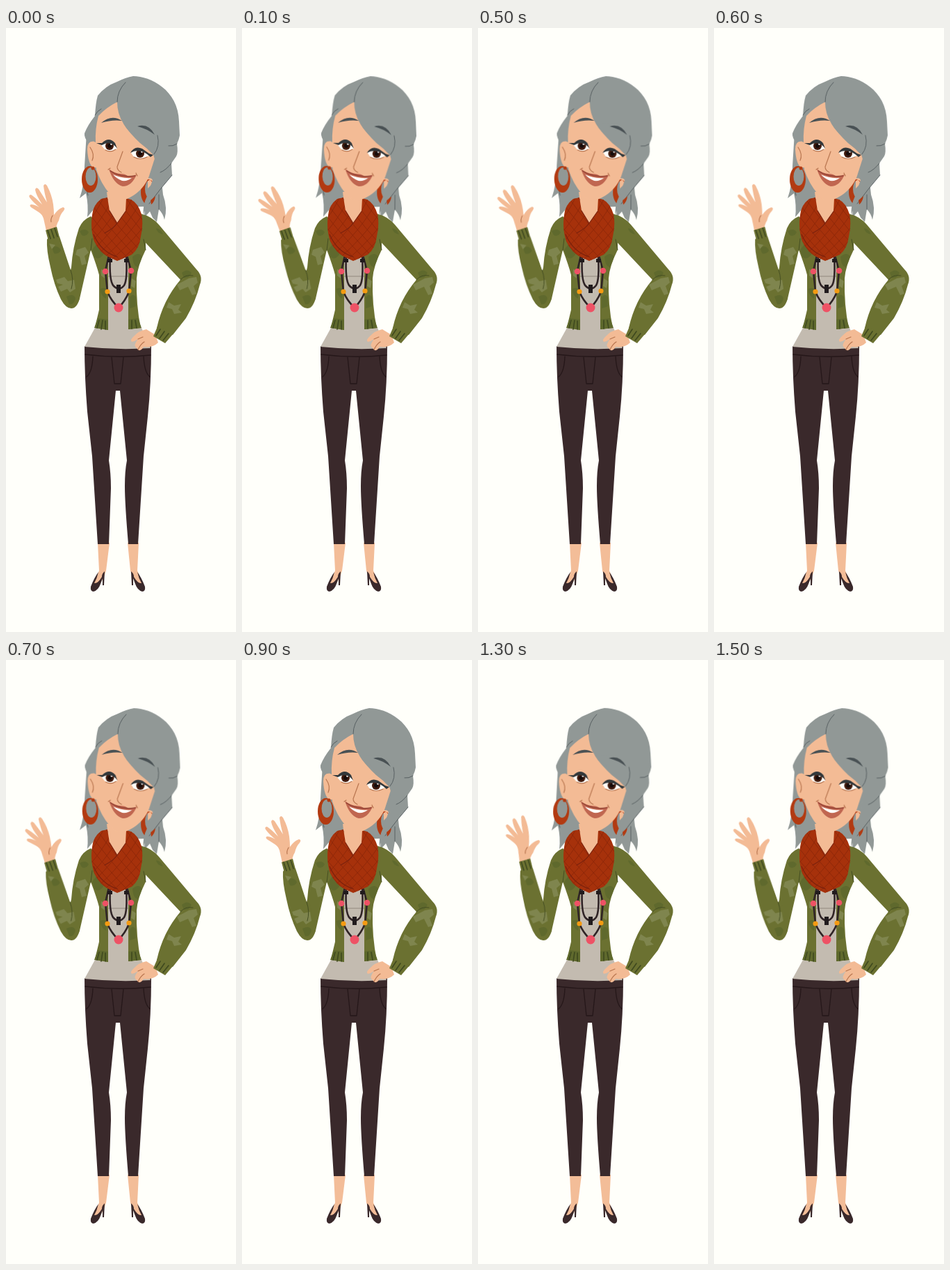
Write an HTML page that moves like this. It is 331 px wide and 866 px high and loops after 1600 ms.

```html
<!DOCTYPE html>
<html lang="en">
<head>
<meta charset="utf-8">
<title>Waving woman</title>
<style>
  html, body { margin: 0; width: 100%; height: 100%; overflow: hidden; background: #fffffa; }
  svg { display: block; width: 100%; height: 100%; }
  .hair { fill: #919896; }
  .skin { fill: #f3bb95; }
  .green { fill: #6b7131; }
  .dark { fill: #3a292b; }
  .rust { fill: #b23a11; }
  .shade { fill: #5f692d; }
  .light { fill: #7f854e; }
  .line { fill: none; stroke-linecap: round; stroke-linejoin: round; }
  .rib { stroke: #3f491f; stroke-width: 1.6; }
  .crease { stroke: #454e22; }
  .strand { stroke: #586062; stroke-width: 1; }
  .fold { stroke: #b8754f; stroke-width: 1.2; }
  .seam { stroke: #251719; stroke-width: 1.3; }
  .cord { stroke: #302426; stroke-width: 2.6; }
  .weave { stroke: #8d280a; stroke-width: .9; }
  .head, .forearm, .hand, .earring { transform-box: view-box; }
  .head { transform-origin: 162px 258px; }
  .forearm { transform-origin: 93px 394px; }
  .hand { transform-origin: 66px 288px; }
  .earring { transform-origin: 125px 199px; }
</style>
</head>
<body>
<svg viewBox="0 0 331 866" xmlns="http://www.w3.org/2000/svg">
  <defs>
    <clipPath id="scarfClip"><path id="scarfShape" d="M137 245Q125 254 124 268Q121 288 127 306Q135 322 147 328L160 334L181 325Q192 316 194 299Q198 282 195 267Q190 251 180 246L173 244L172 263L160 280L149 262L146 243Z"/></clipPath>
  </defs>

  <g class="head">
    <path class="hair" d="M116 150L113 198Q113 224 106 244L115 237Q119 254 117 271L128 258L200 256L199 272L207 263L211 272L217 278L220 260Q226 266 228 275Q233 258 226 239L224 220L235 190Z"/>
    <path class="line strand" d="M116 230L118 240M220 239L220 260"/>
  </g>

  <g id="legs">
    <path fill="#f3bd98" d="M132 738H149L144 778Q141 790 132 801L125 799L134 778ZM175 738H191L189 778L198 799L191 801Q182 790 179 778Z"/>
    <path class="dark" d="M133 780Q127 788 122 801Q121 808 126 808Q133 806 136 797L139 789L139 799H141L142 779Q138 782 138 787Q132 797 127 796Q131 789 133 780ZM189 780Q195 788 200 801Q201 808 196 808Q189 806 186 797L183 789L183 799H181L180 779Q184 782 184 787Q190 797 195 796Q191 789 189 780Z"/>
    <path class="dark" d="M113 456H209Q209 509 204 557L198 614L190 740H176Q171 681 171 657Q171 635 174 620L164 520H158L148 620Q151 638 151 660L148 740H132L124 614L117 550Q113 500 113 456Z"/>
    <path class="line seam" d="M114 468Q160 474 208 469M152 472L156 510H165L169 472M116 500Q124 494 125 471M207 500Q199 494 198 470"/>
  </g>

  <g id="torso">
    <path fill="#c3bbb0" d="M146 320H177V428L195 430L208 459Q160 462 113 457L128 430L146 432Z"/>
    <path class="line" stroke="#91887f" d="M147 356H176"/>
    <path class="green" d="M122 270Q110 275 105 287Q96 314 94 343L87 374L94 401Q102 400 106 388L122 318Q131 342 134 354V404L128 429L147 433V318L130 280Z"/>
    <path class="green" d="M193 266Q210 270 220 282L274 346Q284 356 279 368Q273 392 259 416L240 440L217 430Q226 390 251 361L201 308V318Q189 342 188 359Q187 398 194 430L176 432V320Z"/>
    <path class="shade" d="M106 291q9-5 13 2q-4 7-10 4zM136 374q8-4 9 4l-1 10q-8-4-8-14zM124 318l6-8q9 5 10 15q-7 9-13 3zM182 328q9-8 14 0l-6 15q-7-1-8-15zM178 386q5-7 9 0v13l-9 3zM216 287q7 1 10 9q-9-2-10-9zM253 351q8-7 14 0q-4 9-11 7z"/>
    <path class="light" d="M102 318l12-4 5 8-6 5 3 11-7 2-3-12-6-3zM137 346l7 3-2 10-5-4zM181 359l6 4-2 10-5-3zM246 368l17-9 11-2 2 8-6 5 4 11-6 2-6-12-12 5zM234 393l8 5 10-2-4 8 5 4-11 2-3-7-8-2z"/>
    <path class="shade" d="M132 416L147 418V433L127 430ZM176 418L190 416L195 430L176 432Z"/>
    <path class="line rib" d="M134 419L131 430M139 419L137 432M143 420V432M181 419V431M186 419L188 430"/>
    <path class="line crease" d="M122 319L124 302M201 318L198 303M251 361Q258 353 269 355"/>
    <path class="skin" d="M215 440L202 432Q191 434 184 442Q178 447 181 450Q186 449 190 446Q183 455 187 458Q189 460 191 462Q195 463 198 457Q211 459 219 451Z"/>
    <path class="line fold" d="M190 446L197 443M190 461Q194 453 199 450"/>
    <path class="green" d="M218 428L241 438L229 452L212 442Z"/>
    <path class="line rib" d="M222 432L216 441M228 435L221 445M234 438L226 448"/>
  </g>

  <g id="necklaces">
    <path class="line cord" d="M148 326L143 348L146 378Q151 391 162 401Q172 391 177 378L180 348L174 326M150 326Q148 363 155 370Q163 378 170 369Q175 361 173 326"/>
    <path fill="#211b1d" d="M146 331h7v5h-7zM170 331h7v5h-7zM159 368h6v12h-6z"/>
    <g fill="#ee5265"><circle cx="143" cy="349" r="4.3"/><circle cx="180" cy="348" r="4.3"/><circle cx="162" cy="401" r="6.5"/></g>
    <g fill="#f49b12"><circle cx="146" cy="378" r="3.6"/><circle cx="177" cy="377" r="3.6"/></g>
  </g>

  <g class="forearm">
    <g class="hand">
      <path class="skin" d="M58 291L54 273Q52 267 47 264L36 257Q33 254 36 253Q41 253 48 257Q39 250 34 243Q32 239 36 239Q40 241 52 253Q43 239 42 232Q43 227 47 231L59 250Q55 236 54 226Q56 222 59 226Q66 239 68 253Q69 261 69 268Q74 260 82 257Q86 258 83 262Q78 267 76 276Q72 282 72 291Z"/>
      <path class="line fold" d="M67 269Q64 274 65 278"/>
    </g>
    <path class="green" d="M59 303Q67 296 77 299L93 347L98 350L106 388Q102 402 94 402Q86 402 79 389Q69 368 64 343Q58 318 59 303Z"/>
    <path class="shade" d="M66 315q9-5 13 4q-4 6-10 4zM87 385q11-5 13 3q-3 10-9 8z"/>
    <path class="light" d="M72 361l12-4 5 6 9-2 2 13-8 5-4-5-9 4-4-7 7-3-8-2zM62 309l9 2-5 6z"/>
    <path class="line crease" d="M93 347Q98 361 94 374"/>
    <path class="green" d="M57 290L73 285L77 300L61 305Z"/>
    <path class="line rib" d="M60 290L64 302M65 289L69 301M70 287L74 299"/>
  </g>

  <path class="skin" d="M145 235H176L173 263L160 282L148 262Z"/>
  <use href="#scarfShape" fill="#a6310b"/>
  <path id="weave" class="line weave" clip-path="url(#scarfClip)"/>
  <path class="line" stroke="#7a210d" stroke-width="1.2" d="M149 262L160 280L172 263M160 280Q154 288 142 294M126 296Q137 321 160 328"/>

  <g class="head">
    <path class="skin" d="M128 163Q117 160 117 174Q118 194 125 200H132ZM204 216Q211 213 212 222L204 230Z"/>
    <path class="line fold" d="M121 171Q128 181 124 190"/>
    <path class="rust" fill-rule="evenodd" d="M194 235a10 18 0 1 0 20 0a10 18 0 1 0-20 0ZM200 231a7 13 0 1 0 14 0a7 13 0 1 0-14 0Z"/>
    <path class="skin" d="M160 102L130 120L125 166L130 203Q136 222 150 239Q160 251 174 245Q195 236 205 215L214 187L198 144Z"/>
    <path class="hair" d="M119 165Q112 157 113 151Q117 140 128 126Q129 107 132 97Q143 83 160 77Q172 71 183 69C208 69 248 89 249 134L250 154Q249 160 246 166Q248 179 245 184L238 194L239 211L223 230Q216 244 207 253Q199 260 198 269Q196 255 203 241L212 215L211 207Q216 194 213 183L203 173L193 165Q177 150 169 137Q160 123 160 106Q144 114 133 126Q128 145 129 164Q124 160 119 165Z"/>
    <path class="hair" d="M169 137Q177 151 188 156L184 149Q195 166 216 181L219 152L187 136Z"/>
    <path class="line strand" d="M160 106Q160 90 172 78M128 125Q131 119 137 116M213 181Q222 170 218 154M238 194Q230 204 222 207M239 211L223 230L206 252M246 166Q240 170 234 169"/>
    <path class="rust" d="M208 247L215 241Q214 249 209 253Z"/>

    <g id="eyes">
      <path fill="#fffefa" d="M137 168Q149 156 160 173Q151 180 142 174ZM180 179Q190 168 207 182Q195 191 184 185Z"/>
      <g fill="#401a0d"><circle cx="149" cy="169" r="6"/><circle cx="193" cy="180" r="6"/></g>
      <g fill="#160c0b"><circle cx="149" cy="169" r="3"/><circle cx="193" cy="180" r="3"/></g>
      <g fill="#fff"><circle cx="151.500" cy="166.500" r="1.3"/><circle cx="195.500" cy="177.500" r="1.3"/></g>
      <path fill="#32383b" d="M130 165L138 165Q148 155 157 165L160 173Q151 160 138 168ZM179 179Q185 168 196 173L206 180L212 182L208 185Q193 171 179 179Z"/>
      <path class="line fold" d="M143 175Q151 179 158 174M184 185Q193 190 203 185"/>
      <path fill="#495154" d="M137 136Q152 123 167 133Q153 131 137 136ZM189 141Q205 136 214 153Q202 144 189 141Z"/>
    </g>
    <path class="line fold" stroke-width="1.5" d="M168 177L160 199Q160 204 166 207"/>
    <path fill="#c06650" d="M148 202Q157 209 165 209Q171 209 175 212Q181 213 188 210Q181 227 168 227Q155 224 148 202Z"/>
    <path fill="#fffefa" d="M154 210Q166 216 181 215Q175 220 167 219Q159 216 154 210Z"/>
    <path class="line" stroke="#7f3226" d="M150 205Q165 215 186 212"/>
    <path class="line fold" d="M147 203L150 201M187 208L189 212"/>
    <g class="earring">
      <path class="rust" fill-rule="evenodd" d="M109 217a11.500 19 0 1 0 23 0a11.500 19 0 1 0-23 0ZM114.500 213a7.500 13 0 1 0 15 0a7.500 13 0 1 0-15 0Z"/>
      <circle class="rust" cx="125" cy="201" r="2.5"/>
    </g>
  </g>
</svg>
<script>
  const weave = [];
  for (let i = -7; i < 12; i++) {
    const x = 100 + i * 14;
    weave.push(`M${x} 240Q${x + 32} 286 ${x + 82} 337`, `M${x + 70} 240Q${x + 46} 291 ${x - 10} 337`);
  }
  document.getElementById("weave").setAttribute("d", weave.join(""));

  // Lean of the wave in 100 ms steps: 0 is inward, 1 is outward.
  const lean = [.39, 1, .55, 0, .5, .72, .35, .74, .6, .39, .39, 1, .55, 0, .5, .72];
  const REST = .39;

  function swing(selector, degrees) {
    const frames = lean.map((value, i) => ({
      transform: `rotate(${degrees * (value - REST)}deg)`,
      offset: i / lean.length,
      easing: "steps(1, end)"
    }));
    frames.push({ ...frames[0], offset: 1 });
    for (const part of document.querySelectorAll(selector)) {
      const motion = part.animate(frames, { duration: 1600, iterations: Infinity });
      motion.startTime = 0;
    }
  }

  swing(".forearm", -3);
  swing(".hand", -11);
  swing(".head", 0.9);
  swing(".earring", -5);
</script>
</body>
</html>
```
